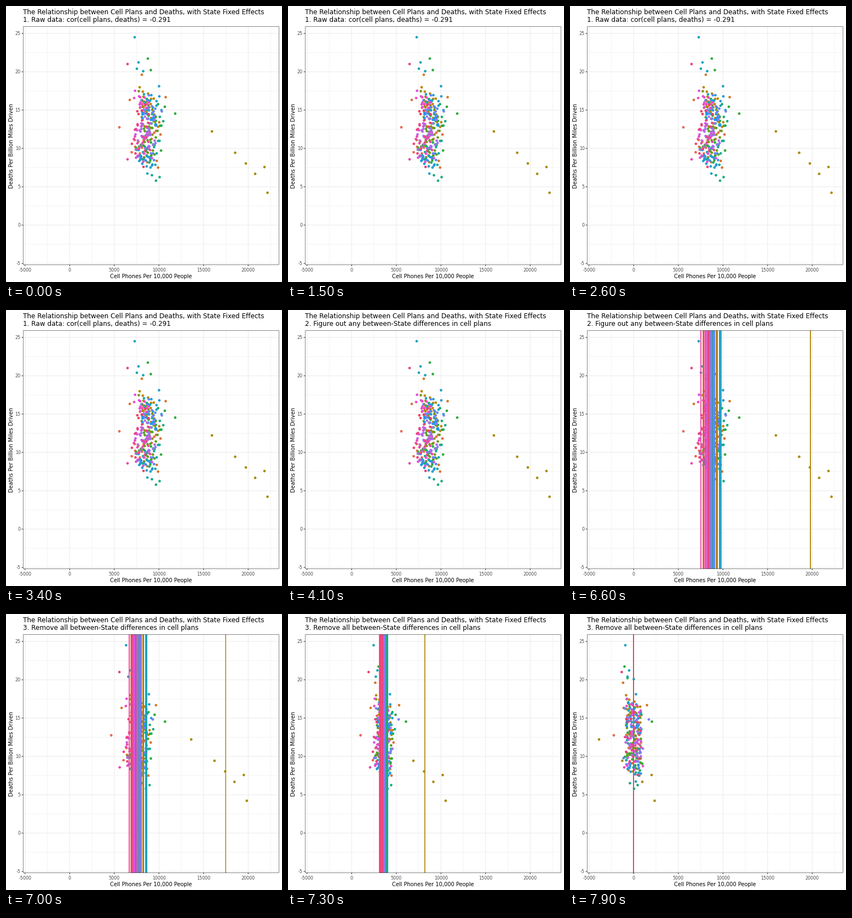
Write a matplotlib script that moves like this. It is 504 by 504 pixels and loops after 8 s.

```python
import numpy as np
import matplotlib.pyplot as plt
from matplotlib.animation import FuncAnimation
from matplotlib.colors import LinearSegmentedColormap
from matplotlib.patches import Rectangle

SIZE, DPI = 504, 72
FRAMES, INTERVAL = 80, 100
LEFT, RIGHT, TOP, BOTTOM = 31.3, 498.4, 37.7, 472.4
ZERO = 116.2
STATES, YEARS = 51, 6
TITLE = "The Relationship between Cell Plans and Deaths, with State Fixed Effects"
STEPS = (
    "1. Raw data: cor(cell plans, deaths) = -0.291",
    "2. Figure out any between-State differences in cell plans",
    "3. Remove all between-State differences in cell plans",
)
STEP2, LINES_ON, MOVE_START, MOVE_LEN = 41, 43, 68, 9
HUES = ("#F0635A", "#C98208", "#6A9C10", "#1AB04A", "#14A8B8",
        "#2596F0", "#9A78FA", "#EA4CD8", "#EE4163")

# Outlying points in pixels, by state: (distance of the mean from zero, points)
OUTLIERS = {
    1: (127, [(207, 221.5)]),
    3: (128, [(226, 171.5)]),
    4: (151, [(248, 125.5), (291.5, 166.5)]),
    8: (323, [(376, 229), (418.5, 268), (438, 287.5), (455, 306.5),
              (472, 294), (477.5, 341)]),
    17: (159.5, [(259, 96), (264.5, 117), (309, 196.5), (290, 184)]),
    22: (157, [(280.5, 312.5), (274, 319), (266.5, 309)]),
    26: (134, [(235, 57), (242, 103), (239, 114.5), (250.5, 119)]),
    36: (140.5, [(284.5, 192.5)]),
    46: (123, [(222, 280)]),
    49: (127.5, [(222, 106)]),
}


def px(x):
    return ZERO + x * 0.016306


def py(y):
    return 400.1 - 14 * y


def mean_shift(state, rng):
    """Low means for the last states, central ones for the blue-violet group."""
    if state > 39:
        return rng.uniform(126, 137)
    if state > 28:
        return rng.uniform(137, 148)
    return np.clip(rng.normal(146, 7), 129, 159)


def make_data():
    rng = np.random.default_rng(7)
    levels = rng.permutation(np.linspace(168, 288, STATES))
    shifts, points = np.empty(STATES), np.empty((STATES, YEARS, 2))
    for s, level in enumerate(levels):
        shifts[s], known = OUTLIERS.get(s, (mean_shift(s, rng), []))
        step = rng.permutation(np.linspace(-12, 12, YEARS))
        x = ZERO + shifts[s] + step + rng.normal(0, 2.5, YEARS)
        y = level + 0.6 * step + rng.normal(0, 9, YEARS)
        points[s] = np.column_stack([x, np.clip(y, 142, 306)])
        if known:
            points[s, :len(known)] = known
    return np.repeat(shifts, YEARS), points.reshape(-1, 2)


shift, points = make_data()
cmap = LinearSegmentedColormap.from_list("states", HUES, N=STATES)
colors = np.repeat(cmap(np.arange(STATES)), YEARS, axis=0)

fig = plt.figure(figsize=(SIZE / DPI, SIZE / DPI), dpi=DPI, facecolor="white")
ax = fig.add_axes([0, 0, 1, 1])
ax.set(xlim=(0, SIZE), ylim=(SIZE, 0))
ax.axis("off")


def line(x, y, color, width):
    ax.plot(x, y, color=color, lw=width, zorder=1, snap=False,
            solid_capstyle="butt")


def label(x, y, text, size, color="black", **kw):
    return ax.text(x, y, text, fontsize=size, color=color,
                   **{"va": "baseline", **kw})


GRID, DARK, TICK_TEXT = "#EBEBEB", "#333333", "#4D4D4D"
for v in range(-5000, 22501, 2500):
    major = v % 5000 == 0
    line([px(v)] * 2, [TOP, BOTTOM], GRID, 1.07 if major else 0.53)
    if major:
        line([px(v)] * 2, [BOTTOM, BOTTOM + 2.75], DARK, 1.07)
        label(px(v), 485, str(v), 8, TICK_TEXT, ha="center")
for v in np.arange(-5, 25.1, 2.5):
    major = v % 5 == 0
    line([LEFT, RIGHT], [py(v)] * 2, GRID, 1.07 if major else 0.53)
    if major:
        line([LEFT - 2.75, LEFT], [py(v)] * 2, DARK, 1.07)
        label(26.7, py(v) + 2.8, f"{v:.0f}", 8, TICK_TEXT, ha="right")

ax.add_patch(Rectangle((LEFT, TOP), RIGHT - LEFT, BOTTOM - TOP, fill=False,
                       ec=DARK, lw=0.6, zorder=5, snap=False))
label(LEFT, 15.3, TITLE, 12)
subtitle = label(LEFT, 29.3, STEPS[0], 12)
label(264.7, 497, "Cell Phones Per 10,000 People", 9.85, ha="center")
label(10, 255, "Deaths Per Billion Miles Driven", 10.1, ha="center",
      va="center", rotation=90)

dots = ax.scatter(*points.T, s=4.7 ** 2, c=colors, linewidths=0, zorder=3)
means = ax.vlines(ZERO + shift, TOP, BOTTOM, colors=colors, lw=1.07,
                  zorder=4, snap=False)


def update(i):
    t = np.clip((i - MOVE_START) / MOVE_LEN, 0, 1)
    ease = (1 - np.cos(np.pi * t)) / 2
    dots.set_offsets(points - np.outer(shift * ease, (1, 0)))
    means.set_segments([[(x, TOP), (x, BOTTOM)]
                        for x in ZERO + shift * (1 - ease)])
    means.set_visible(i >= LINES_ON)
    subtitle.set_text(STEPS[(i >= STEP2) + (i > MOVE_START)])
    return dots, means, subtitle


anim = FuncAnimation(fig, update, frames=FRAMES, interval=INTERVAL,
                     repeat=True, repeat_delay=0)
plt.show()
```
